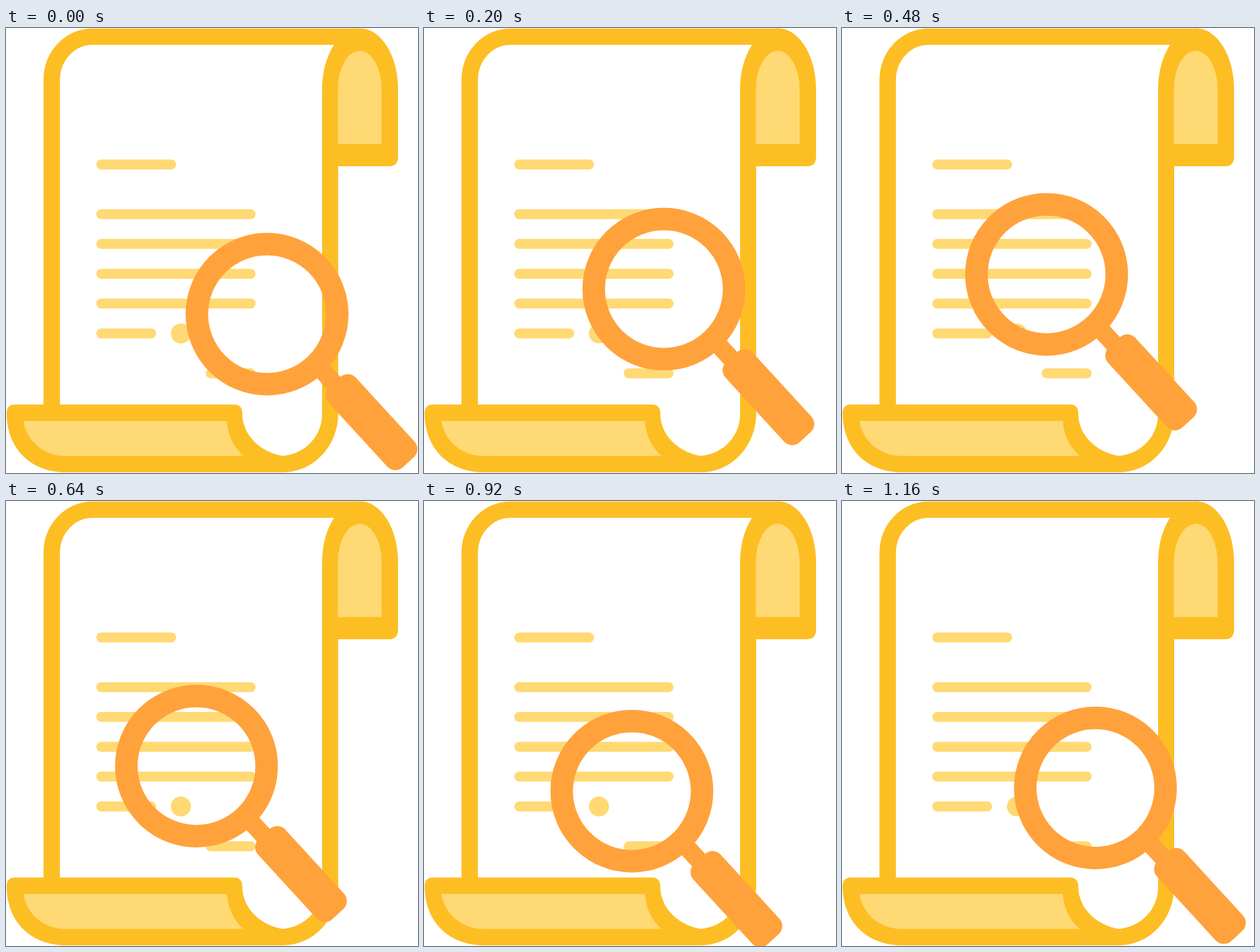
Animation of 640x692 px, one loop 1200 ms. Source, as an HTML page without scripts:

```html
<!DOCTYPE html>
<html lang="en">
<head>
<meta charset="utf-8">
<title>Document search</title>
<style>
  html, body { margin: 0; width: 100%; height: 100%; overflow: hidden; background: #fff; }
  svg { display: block; width: 100%; height: 100%; }
  .gold { fill: #fdbe24; }
  .pale { fill: #ffd973; }
  .edge { fill: none; stroke: #fdbe24; stroke-width: 25.5; }
  .text { fill: none; stroke: #ffd973; stroke-width: 15.5; stroke-linecap: round; }
  .lens {
    fill: #ffa23b;
    offset-path: path("M405.5 445 C382 419 350 373 334 375 C314 377 285 418 287.8 447.8 C326 455 365 449 405.5 445");
    offset-rotate: 0deg;
    animation: sweep 1.2s -1ms infinite;
  }
  /* three legs of equal time, each at constant speed, 25 poses a second */
  @keyframes sweep {
    0% { offset-distance: 0%; animation-timing-function: steps(10); }
    33.3333% { offset-distance: 32.64%; animation-timing-function: steps(10); }
    66.6667% { offset-distance: 62.03%; animation-timing-function: steps(10); }
    100% { offset-distance: 100%; }
  }
</style>
</head>
<body>
<svg viewBox="0 0 640 692">
  <!-- page and top curl -->
  <path class="edge" d="M71 600 V81 A63 67.5 0 0 1 134 13.5 H550"/>
  <path class="gold" d="M491 95 A59 94.5 0 0 1 609 95 V200 Q609 215 595 215 H516 V600 A86 91 0 0 1 430 691 V665.5 C465 662 491 635 491 600 Z"/>
  <path class="pale" d="M515.5 180.5 V95 A34 59.5 0 0 1 583.5 95 V180.5 Z"/>

  <!-- bottom curl -->
  <path class="gold" d="M1 599 Q1 585.5 14 585.5 H354 Q367 585.5 367 599 C367 635 398 661 431 665.5 V691 H93 C40 691 1 655 1 599 Z"/>
  <path class="pale" d="M27 611 H343 C345 635 354 652 369 665.5 H93 C58 665.5 32 642 27 611 Z"/>

  <path class="text" d="M148 212.3 H256.5 M148 289.5 H380 M148 335.8 H380 M148 382.2 H380 M148 428.5 H380 M148 475 H225.5 M318 537 H380"/>
  <circle class="pale" cx="271.7" cy="475" r="15.6"/>

  <g class="lens">
    <circle r="109" fill="none" stroke="#ffa23b" stroke-width="35"/>
    <g transform="rotate(47.5)">
      <rect x="115" y="-18" width="40" height="28"/>
      <rect x="149" y="-35" width="169" height="57.5" rx="17"/>
    </g>
  </g>
</svg>
</body>
</html>
```
